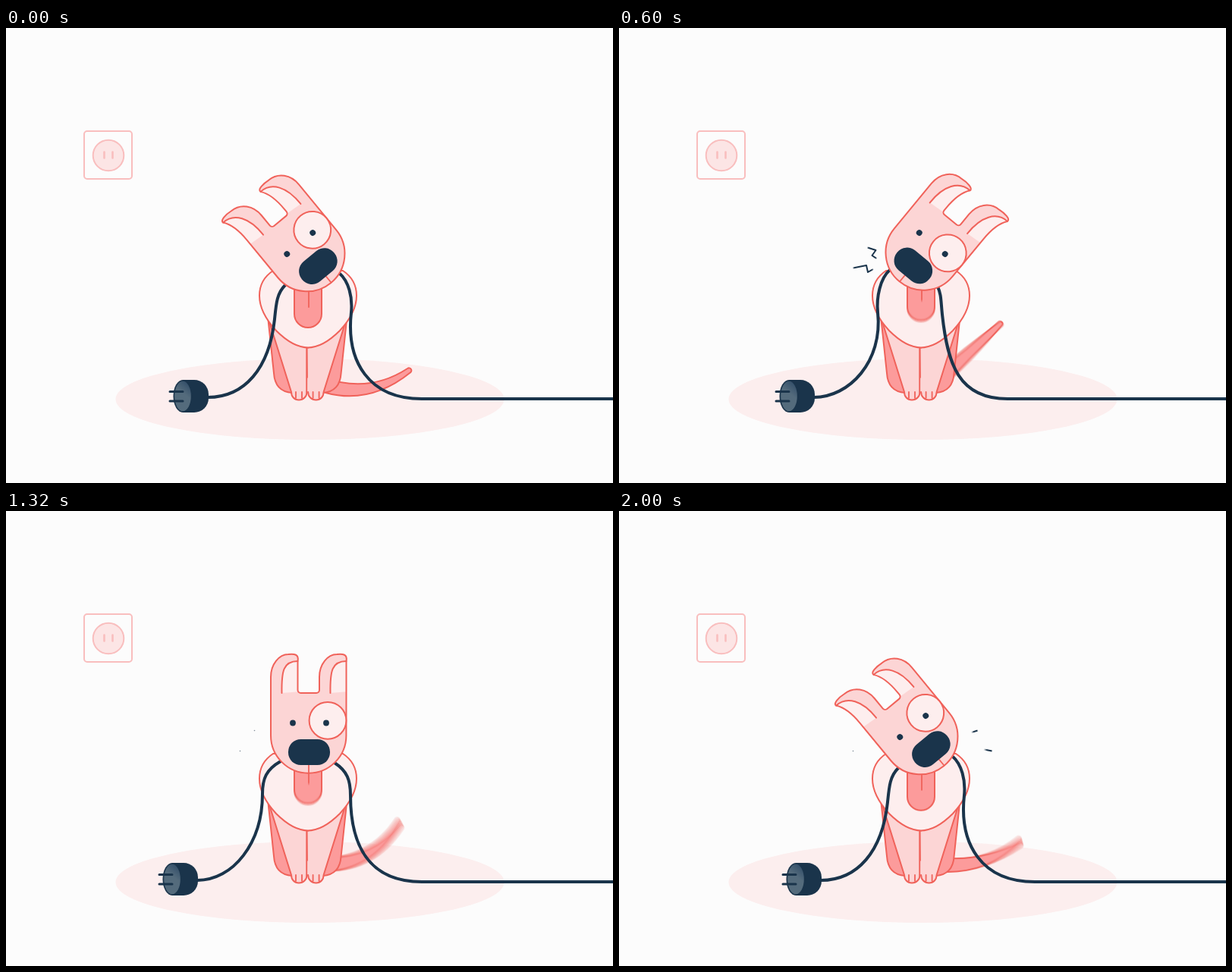
Write an HTML page with a canvas that moves like this. It is 800 px wide and 600 px high and loops after 2.04 s.

```html
<!DOCTYPE html>
<html lang="en">
<head>
<meta charset="utf-8">
<title>Dog with a plug</title>
<style>
html, body { margin: 0; width: 100%; height: 100%; overflow: hidden; background: #fcfcfc; }
canvas { display: block; width: 800px; height: 600px; }
</style>
</head>
<body>
<canvas id="stage" width="800" height="600"></canvas>
<script>
const W = 800, H = 600, LOOP = 2040, STEP = 40, SAMPLES = 8;
const BG = '#fcfcfc', LIGHT = '#fdeeee', PINK = '#fcd5d5', ROSE = '#fc9b9b';
const RED = '#f0625a', NAVY = '#1a344b', FAINT = '#f9bebe';
const TILT = 39.5 * Math.PI / 180, PIVOT = { x: 400, y: 299.5 };
const EAR_WIDTH = 35.5, EARS = [349, 413];

const out = document.getElementById('stage').getContext('2d');
const layer = document.createElement('canvas');
layer.width = W;
layer.height = H;
const g = layer.getContext('2d');

// lean: -1 left, 1 right; mouth and knee: where each cord leaves the head and bends down
const LEFT = { lean: -1, plug: 0, floor: 548, mouthA: [368, 339], kneeA: [354, 384], mouthB: [439, 323], kneeB: [455, 375] };
const RIGHT = { lean: 1, plug: -9, floor: 512, mouthA: [357, 319], kneeA: [341, 375], mouthB: [420, 341], kneeB: [426, 378] };
const UPRIGHT = { lean: 0, plug: -14, floor: 548, mouthA: [362, 330], kneeA: [338, 373], mouthB: [433, 332], kneeB: [454, 375] };

const swings = [
  { from: LEFT, to: RIGHT, start: 6, length: 8 },
  { from: RIGHT, to: UPRIGHT, start: 24, length: 4 },
  { from: UPRIGHT, to: LEFT, start: 42, length: 4 }
];

const zigzags = [
  [[339.5, 304], [333.5, 300], [338.5, 293], [327.5, 289.5]],
  [[335, 318], [328, 322], [326, 313], [308.5, 316.5]]
];

const clamp = v => Math.max(0, Math.min(1, v));
const lerp = (a, b, p) => a + (b - a) * p;
function ease(v) {
  const x = clamp(v);
  return x * x * x * (x * (6 * x - 15) + 10);
}
function mix(a, b, p) {
  return Array.isArray(a) ? a.map((v, i) => lerp(v, b[i], p)) : lerp(a, b, p);
}

// The cord trails the head a little, the ears trail it more
function poseAt(k) {
  const { from, to, start, length } = swings.findLast(s => k >= s.start) || swings[0];
  const u = (k - start) / length;
  const pose = {};
  for (const key in from) pose[key] = mix(from[key], to[key], ease(u - 0.04));
  pose.angle = TILT * lerp(from.lean, to.lean, ease(u));
  pose.ears = lerp(from.lean, to.lean, ease((u - 0.36) / 0.64));
  return pose;
}

function paint(path, fill, stroke, width = 2) {
  if (fill) { g.fillStyle = fill; g.fill(path); }
  if (stroke) { g.strokeStyle = stroke; g.lineWidth = width; g.stroke(path); }
}
const shape = (d, fill, stroke, width) => paint(new Path2D(d), fill, stroke, width);

function ellipse(x, y, rx, ry, fill, stroke, width) {
  const p = new Path2D();
  p.ellipse(x, y, rx, ry, 0, 0, Math.PI * 2);
  paint(p, fill, stroke, width);
}

function pill(x, y, w, h, r, fill, stroke, width) {
  const p = new Path2D();
  p.roundRect(x, y, w, h, r);
  paint(p, fill, stroke, width);
}

// Draws a part and its mirror image
function halves(axis, draw) {
  draw();
  g.save();
  g.translate(axis * 2, 0);
  g.scale(-1, 1);
  draw();
  g.restore();
}

function room() {
  g.fillStyle = BG;
  g.fillRect(0, 0, W, H);
  pill(103, 136, 63, 63, 4, null, FAINT);
  ellipse(135, 168, 20.3, 20.3, '#fce5e5', FAINT);
  shape('M129.5 163.5V171.5M140.5 163.5V171.5', null, FAINT, 2.6);
  ellipse(400.5, 489.5, 256, 53.5, '#fceeee');
}

function tail(k) {
  const rest = clamp(1 - k / 2);
  const phase = (k < 10 ? 2 + 0.8 * k : k) * Math.PI / 4;
  const a = (25 - 18 * Math.sin(phase - 0.2)) * Math.PI / 180;
  const sag = lerp(30 * Math.cos(phase), 28, rest);
  const nx = Math.sin(a), ny = Math.cos(a);
  const bx = 420, by = 466 + 5 * rest;
  const tx = bx + 112 * ny, ty = 466 - 112 * nx;
  const cx = (bx + tx) / 2 + nx * sag, cy = (by + ty) / 2 + ny * sag;
  const d = Math.atan2(ty - cy, tx - cx), r = 3.3;
  const p = new Path2D();
  p.moveTo(bx - nx * 10, by - ny * 10);
  p.quadraticCurveTo(cx - nx * 7, cy - ny * 7, tx + Math.sin(d) * r, ty - Math.cos(d) * r);
  p.arc(tx, ty, r, d - Math.PI / 2, d + Math.PI / 2);
  p.quadraticCurveTo(cx + nx * 8, cy + ny * 8, bx + nx * 10, by + ny * 10);
  paint(p, ROSE, RED);
}

function body() {
  halves(397.3, () => {
    shape('M345 380L353 455C354 472 362 480 377 481L397 460V400Z', ROSE, RED);
    shape('M397.5 400L345 381L376 480C376 486 380 490.5 386 490.5C392 490.5 396.5 486 396.5 480', PINK, RED);
    shape('M382 480V488M390 480V488', null, RED, 1.8);
  });
  shape('M396.3 420V480', null, RED);
  halves(398, () => shape('M398.5 421.5C385 421.5 370 413 356 399C344 386 334 371 334 353C334 340 340 328 352 320H398.5', LIGHT, RED));
}

function tongue(k) {
  const phase = k < 10 ? 1 + 0.9 * k : k;
  const y = 384 + 11 * Math.abs(Math.sin(phase * Math.PI / 2));
  pill(380, 325, 36, y - 325, [0, 0, 18, 18], ROSE, RED);
  shape(`M399 340V${y - 27}`, null, RED, 1.8);
}

// From the mouth round the knee down to the floor at endX; pull flattens the landing
function cord([mx, my], [x, y], lean, endX, endY, pull, tailX) {
  const p = new Path2D();
  p.moveTo(mx, my);
  p.bezierCurveTo(lerp(mx, x, 0.8), my + 11, x - lean * 2, y - 20, x, y);
  p.bezierCurveTo(x + lean * 7, y + 65, lerp(endX, x, pull), endY, endX, endY);
  p.lineTo(tailX, endY);
  paint(p, null, NAVY, 4);
}

function plug(dx) {
  g.save();
  g.translate(dx, 0);
  pill(233, 464, 34, 43, [0, 19, 19, 0], NAVY);
  ellipse(233, 485.5, 12.5, 21.5, NAVY);
  const shade = g.createLinearGradient(228, 492, 244, 472);
  shade.addColorStop(0.45, '#546b7c');
  shade.addColorStop(1, '#35506a');
  ellipse(233, 485.5, 10.8, 19.8, shade);
  shape('M216 479.5H233M216 492H233', null, NAVY, 3);
  g.restore();
}

// One ear from its key points: base, peak, tip, base; the tip reaches out as it leans
function earAt(left, lean) {
  const bend = Math.abs(lean), side = lean < 0 ? -1 : 1;
  const peak = 23 + 4 * bend, tipX = EAR_WIDTH + 9.5 * bend, tipY = 198 - 4 * bend;
  const place = ([x, y]) => [left + (side > 0 ? x : EAR_WIDTH - x), y];
  const edge = [
    [0, 219], [0, 202], [11, 189], [peak, 189], [peak + 8, 188], [tipX + 2, 189],
    [tipX, tipY], [tipX - 7 * bend, tipY + 9], [EAR_WIDTH, 214], [EAR_WIDTH, 232]
  ].map(place);
  const line = [[tipX, tipY], [tipX - 19, tipY - bend], [14, 211], [14.5, 240]].map(place);
  return { edge: side > 0 ? edge : edge.reverse(), line, side };
}

function trace(p, pts) {
  p.lineTo(...pts[0]);
  for (let i = 1; i < pts.length; i += 3) p.bezierCurveTo(...pts[i], ...pts[i + 1], ...pts[i + 2]);
}

function head(pose) {
  const ears = EARS.map(x => earAt(x, pose.ears));
  const outline = new Path2D();
  outline.moveTo(349, 296);
  trace(outline, ears[0].edge);
  outline.arcTo(384.5, 240, 400, 240, 4);
  outline.arcTo(413, 240, 413, 230, 4);
  trace(outline, ears[1].edge);
  outline.arc(398.7, 296, 49.7, 0, Math.PI);
  outline.closePath();

  g.save();
  g.translate(PIVOT.x, PIVOT.y);
  g.rotate(pose.angle);
  g.translate(-PIVOT.x, -PIVOT.y);
  paint(outline, PINK);
  for (const { line, side } of ears) {
    const inner = new Path2D();
    trace(inner, line);
    const area = new Path2D(inner);
    area.lineTo(line[3][0] + side * 26, 238);
    area.lineTo(line[0][0] + side * 2, line[0][1]);
    g.save();
    g.clip(outline);
    paint(area, LIGHT);
    g.restore();
    paint(inner, null, RED);
  }
  paint(outline, null, RED);
  ellipse(424, 276.3, 24.4, 24.4, LIGHT, RED);
  for (const x of [378, 422]) ellipse(x, 279.5, 3.9, 3.9, NAVY);
  shape('M399 334V345', null, RED, 1.8);
  pill(372, 301, 55, 34, 16.5, NAVY);
  g.restore();
}

// Each spark draws itself outwards, then erases the same way
function spark(pts, age) {
  const a = clamp(age / 4 - 1), b = clamp(age / 4);
  if (b <= a) return;
  const p = new Path2D();
  let len = 0;
  pts.forEach(([x, y], i) => {
    p.lineTo(x, y);
    if (i) len += Math.hypot(x - pts[i - 1][0], y - pts[i - 1][1]);
  });
  g.save();
  g.lineCap = 'butt';
  g.setLineDash([0, a * len, (b - a) * len, len * 2]);
  paint(p, null, NAVY, 2);
  g.restore();
}

function sparks(k) {
  zigzags.forEach((pts, i) => {
    spark(pts, k - 10);
    spark(pts.map(([x, y]) => [800 - x, y]), k - 42);
    const [x, y] = pts[3];
    if (k >= 18 && k < 48 + i * 2) ellipse(x, y, 0.8, 0.8, '#7d8a96');
  });
}

function scene(k) {
  const pose = poseAt(k);
  g.lineCap = g.lineJoin = 'round';
  room();
  tail(k);
  body();
  tongue(k);
  cord(pose.mouthA, pose.kneeA, pose.lean, 266 + pose.plug, 487, 0.55, 260 + pose.plug);
  cord(pose.mouthB, pose.kneeB, pose.lean, pose.floor, 489, 0.75, W + 5);
  plug(pose.plug);
  head(pose);
  sparks(k);
}

// Averages several moments to give motion blur
function render(k) {
  const count = k ? SAMPLES : 1;
  for (let i = 0; i < count; i++) {
    scene(k + ((i + 0.5) / count - 0.5) * 0.5);
    out.globalAlpha = 1 / (i + 1);
    out.drawImage(layer, 0, 0);
  }
}

const began = performance.now();
let shown = -1;
function tick() {
  const t = (performance.now() - began) % LOOP;
  const k = Math.max(0, Math.floor(t / STEP) - 1);
  if (k !== shown) render(shown = k);
  requestAnimationFrame(tick);
}
tick();
</script>
</body>
</html>
```
